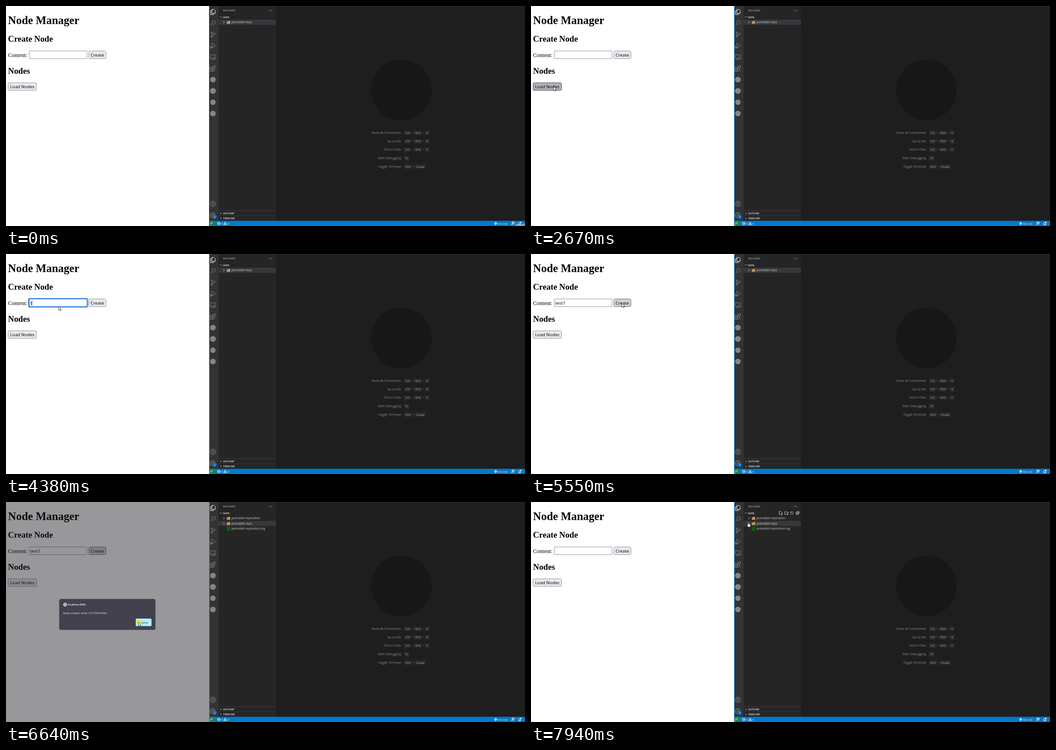
An HTML page for the animation above (8000 ms loop, 1150x487 px).

```html
<!DOCTYPE html>
<html lang="en">
<head>
<meta charset="utf-8">
<title>Node Manager</title>
<style>
html, body { margin: 0; width: 100%; height: 100%; overflow: hidden; background: #fff; }
svg { display: block; width: 100%; height: 100%; }
text { font-family: "Open Sans", "Noto Sans", sans-serif; white-space: pre; }
.serif { font-family: "Liberation Serif", serif; }
.bold { font-weight: 700; }
.form { font-size: 9.73px; }
.tree { font-size: 6.46px; fill: #ccc; }
.section { font-size: 5.6px; font-weight: 700; fill: #ccc; }
.label { font-size: 6.9px; fill: #8b8b8b; text-anchor: end; }
.key { font-size: 5.5px; fill: #aaa; text-anchor: middle; }
.dialog { font-size: 5.71px; fill: #fbfbfe; }
.line { fill: none; stroke-width: 1; stroke-linejoin: round; stroke-linecap: round; }
.btn { fill: #e9e9ed; stroke: #8f8f9d; }
.btn.hover { fill: #d0d0d7; stroke: #676774; }
.btn.active { fill: #b1b1b9; stroke: #484851; }
.field { fill: #fff; stroke: #8f8f9d; }
.field.hover { stroke: #676774; }
.hidden { display: none; }
</style>
</head>
<body>
<svg viewBox="0 0 1150 487" preserveAspectRatio="none">
  <rect width="451" height="487" fill="#fff"/>
  <g class="serif">
    <text class="serif bold" x="4.6" y="40" font-size="24.8">Node Manager</text>
    <text class="serif bold" x="4.6" y="79" font-size="18.6">Create Node</text>
    <text class="serif" x="4.6" y="112.6" font-size="12.4">Content:</text>
    <text class="serif bold" x="4.6" y="149.6" font-size="18.6">Nodes</text>
  </g>
  <rect id="field" class="field" x="51.5" y="99.5" width="128" height="17" rx="1.5"/>
  <g id="focus" fill="none">
    <rect x="49.2" y="97.8" width="132.8" height="20.4" rx="3" stroke="#bcd2f5" stroke-width="1.6"/>
    <rect x="50.7" y="99.2" width="129.2" height="17.6" rx="1.8" stroke="#0060df" stroke-width="1.7"/>
  </g>
  <text id="typed" class="form" x="53.7" y="112.2"></text>
  <path id="caret" d="M0 103v11" stroke="#000" stroke-width=".9"/>
  <rect id="create" class="btn" x="183.5" y="99.5" width="38" height="17" rx="3"/>
  <text class="form" x="202.3" y="112.2" text-anchor="middle">Create</text>
  <rect id="load" class="btn" x="4.5" y="169.9" width="63" height="17" rx="3"/>
  <text class="form" x="36" y="182.3" text-anchor="middle">Load Nodes</text>

  <g id="dialog">
    <rect width="451" height="487" fill="#1c1b22" fill-opacity=".45"/>
    <rect x="118" y="214.7" width="213" height="68.3" rx="3.5" fill="#42414d" stroke="#5b5a66" stroke-width=".6"/>
    <g class="line" stroke="#fbfbfe" stroke-width=".8">
      <circle cx="131" cy="227.2" r="3.7"/><ellipse cx="131" cy="227.2" rx="1.6" ry="3.7"/>
      <path d="M127.3 227.2h7.4"/>
    </g>
    <text class="dialog" x="137" y="229.3" font-weight="600">localhost:8080</text>
    <text class="dialog" x="126.6" y="247.7">Node created: node-1731795575502</text>
    <rect id="accept" x="287.5" y="258" width="35" height="16.8" rx="2"/>
    <text class="dialog" x="305" y="268.8" text-anchor="middle" style="fill:#2b2a33">Aceptar</text>
    <circle id="glow" cx="294" cy="266.3" r="6" fill="#d9ec45" fill-opacity=".88"/>
  </g>

  <rect x="451" width="699" height="487" fill="#1e1e1e"/>
  <rect x="451" width="20" height="476" fill="#333"/>
  <rect x="471" width="127" height="476" fill="#252526"/>
  <path d="M451 .5h699" stroke="#343434"/>
  <rect id="edge" x="450" width="1.2" height="487"/>
  <circle cx="876" cy="186" r="67" fill="#171717"/>

  <g class="line" stroke="#858585">
    <path stroke="#fff" d="M456.5 7.5h4l3 3v6h-7zM456.5 10.5h-3.500v8.500h6.500v-2.500"/>
    <g><circle cx="460" cy="36.500" r="3.900"/><path d="M457 39.500l-4 4"/></g>
    <g><circle cx="456" cy="59" r="1.700"/><circle cx="456" cy="67.500" r="1.700"/><circle cx="461.500" cy="61.500" r="1.700"/>
      <path d="M456 60.700v5M461.500 63.200q0 2-5.500 2"/></g>
    <path d="M456 86v-4l8 5.500-5.500 4"/><circle cx="455.500" cy="91" r="2.500"/><path d="M452.500 88.500l1 1M452 91h6.500M452.500 94l1-1"/>
    <path d="M458 116h-5v-8h11v4M454.500 118.500h3.500"/><circle cx="461.500" cy="116" r="2.700"/><path d="M460.700 115l1 1-1 1" stroke-width=".7"/>
    <path d="M452.500 135.500h5v8.500h-5zM452.500 139.500h9.500v4.500h-9.500M459.500 132.500h4.500v4.500h-4.500z"/>
    <circle cx="458.500" cy="438" r="6"/><circle cx="458.500" cy="436.300" r="2.300"/><path d="M454.600 442.500q.5-3 3.900-3t3.900 3"/>
    <circle cx="458" cy="463" r="4.600"/><circle cx="458" cy="463" r="1.700"/>
    <circle cx="458" cy="463" r="5.600" stroke-width="1.600" stroke-dasharray="2 2.400" stroke-linecap="butt"/>
  </g>
  <g fill="#858585">
    <circle cx="458.5" cy="163" r="6.2"/><circle cx="458.5" cy="188" r="6.5"/>
    <circle cx="458.5" cy="213" r="6"/><circle cx="458.5" cy="238" r="6.2"/>
  </g>
  <circle cx="462.7" cy="467.3" r="4.2" fill="#0078d4"/>
  <text x="462.7" y="469.2" font-size="5" fill="#fff" text-anchor="middle">1</text>

  <text x="481" y="11.9" font-size="5.6" fill="#bbb">EXPLORER</text>
  <g fill="#ccc"><circle cx="583.3" cy="10" r=".7"/><circle cx="586" cy="10" r=".7"/><circle cx="588.7" cy="10" r=".7"/></g>
  <path class="line" stroke="#ccc" stroke-width=".9" d="M474 23.500l2 2 2-2M475 457l2 2-2 2M475 468.300l2 2-2 2"/>
  <text class="section" x="481" y="26.500">DATA</text>
  <path d="M471 452.700h127M471 464.300h127" stroke="#414141" stroke-width=".8"/>
  <text class="section" x="481" y="461">OUTLINE</text>
  <text class="section" x="481" y="472.300">TIMELINE</text>
  <g id="tools" class="line" stroke="#c5c5c5" stroke-width=".8">
    <path d="M552 28h-2v-7h4l2 2v2M553.500 27h4M555.500 25v4M564.500 27.500h-2.500v-6h3l1 1h4v2M566 27h4M568 25v4M575.600 22.500a3 3 0 1 0 2.500-1.200M575.500 21v2h2M589.500 23v-2h4.500v4.500h-1.500M587.500 23h5v4.500h-5zM588.800 25.300h2.500"/>
  </g>
  <rect id="selected" x="471" width="127" height="11.5" fill="#37373d"/>
  <g id="replication"></g>
  <g id="repo"></g>
  <g id="log">
    <rect x="489.400" y="55.400" width="7" height="7" fill="#0a3d0a" stroke="#159415" stroke-width=".8"/>
    <path d="M490.800 58h1.500M493 58h2M490.800 60h3" stroke="#1fb01f" stroke-width=".8"/>
    <text class="tree" x="499.700" y="61.300">jackrabbit-replication.log</text>
  </g>
  <g id="welcome"></g>

  <rect x="451" y="475.500" width="699" height="11.500" fill="#007acc"/>
  <rect x="451" y="475.500" width="12.500" height="11.500" fill="#16825d"/>
  <g class="line" stroke="#fff" stroke-width=".8">
    <path d="M452.500 480l2 2-2 2M457.500 478l-2 2 2 2"/>
    <circle cx="471.500" cy="481.300" r="3"/><path d="M470.300 480.100l2.400 2.400M472.700 480.100l-2.400 2.400"/>
    <path d="M485.700 478.300l3 5.700h-6zM485.700 480.500v1.500M485.700 483v.1"/>
    <circle cx="1085" cy="481" r="2.500"/><circle cx="1085" cy="481" r=".7"/><path d="M1085 482v2.500"/>
    <circle cx="1122.300" cy="480.500" r="1.200"/><path d="M1120 484.500q.3-2.300 2.300-2.300t2.300 2.300M1121 478.200h5.200v3.300h-1.500"/>
    <path d="M1135.800 483.300h5.400l-.8-1.300v-1.700a1.900 1.900 0 0 0-3.800 0v1.700zM1138 484.600h1"/>
  </g>
  <circle cx="1140.700" cy="479" r="1.400" fill="#fff"/>
  <g font-size="6.1" fill="#fff">
    <text x="476.600" y="483.600">0</text><text x="490.600" y="483.600">0</text><text x="1090" y="483.600">Go Live</text>
  </g>
  <rect id="corner" x="1129" y="482" width="21" height="5" fill="#a9bfd2" fill-opacity=".6"/>

  <g id="cursor" fill="#fff" stroke="#222" stroke-width=".8" stroke-linejoin="round">
    <path id="arrow" d="M.4 .4V9.600L2.400 7.700 3.900 11 5.400 10.300 4 7.200H6.700Z"/>
    <path id="hand" d="M2.700 6.700V1.300q.8-1 1.600 0V4.500L7.500 5.200Q8.600 5.600 8.400 7L7.600 11.500H3.400L.7 7.600Q.6 6 1.700 6.400Z"/>
  </g>
</svg>
<script>
const LOOP = 8000;
const $ = id => document.getElementById(id);

const folder = (name, y) => `
  <path class="line" stroke="#ccc" stroke-width=".9" d="M482 ${y - 2}l2 2-2 2"/>
  <path fill="#c09553" d="M489.200 ${y - 2.200}h3.200l.8-1h3.600v6.600h-7.600z"/>
  <text class="tree" x="499.700" y="${y + 2.300}">${name}</text>`;
$("replication").innerHTML = folder("jackrabbit-replication", 36);
$("repo").innerHTML = folder("jackrabbit-repo", 36);

const keyBox = (x, w, y, label) => `
  <rect x="${x}" y="${y - 5}" width="${w}" height="10" rx="1.500" fill="#2b2b2b"/>
  <text class="key" x="${x + w / 2}" y="${y + 2}">${label}</text>`;
const plus = (x, y) => `<text class="key" x="${x}" y="${y + 2}">+</text>`;
const chord = letter => y => keyBox(882, 15, y, "Ctrl") + plus(900.5, y) +
  keyBox(904, 17.5, y, "Shift") + plus(925, y) + keyBox(928, 10.5, y, letter);
const commands = [
  ["Show All Commands", chord("A")],
  ["Go to File", chord("N")],
  ["Find in Files", chord("F")],
  ["Start Debugging", y => keyBox(882, 12, y, "F5")],
  ["Toggle Terminal", y => keyBox(882, 17.5, y, "Shift") + plus(903, y) + keyBox(906, 24, y, "Escape")]
];
$("welcome").innerHTML = commands.map(([name, keys], i) => {
  const y = 280.7 + i * 18.7;
  return `<text class="label" x="875.300" y="${y + 2.300}">${name}</text>${keys(y)}`;
}).join("");

// Pointer waypoints: time, x, y
const path = [
  [270, 1003, 420], [620, 740, 290], [1030, 625, 232], [1100, 400, 208], [1240, 257, 190],
  [1520, 165, 164], [1850, 133, 155], [1920, 128, 155], [2120, 128, 155], [2470, 49.5, 177.5],
  [2940, 49.5, 177.5], [3290, 92, 148], [3770, 116, 115], [4590, 116, 115], [4800, 152, 171],
  [5010, 201, 108], [5880, 201, 108], [6370, 293, 265], [7100, 293, 265], [7800, 478, 44]
];
const STEP = 70;

function pointerAt(t) {
  const next = path.findIndex(p => p[0] > t);
  if (next < 0) return path[path.length - 1].slice(1);
  const [t0, x0, y0] = path[Math.max(0, next - 1)];
  const [t1, x1, y1] = path[next];
  const held = Math.floor(Math.max(0, t - t0) / STEP) * STEP;
  const k = next ? held / (t1 - t0) : 0;
  return [x0 + (x1 - x0) * k, y0 + (y1 - y0) * k];
}

const word = "test1";
const keyTimes = [4310, 4450, 4520, 4590, 4730];

function render(t) {
  const during = (a, b) => t >= a && t < b;
  const show = (id, on) => $(id).classList.toggle("hidden", !on);
  const state = (id, hover, active) => {
    $(id).classList.toggle("hover", hover);
    $(id).classList.toggle("active", active);
  };

  show("corner", t < 70);
  $("edge").setAttribute("fill", t < 1450 ? "#333" : "#0a84d8");

  state("load", during(2400, 3150), during(2670, 2810));
  state("create", during(5010, 6910), during(5410, 5550));
  state("field", during(3640, 4660), false);

  const focused = during(3840, 5480);
  const typed = t < 6910 ? word.slice(0, keyTimes.filter(k => t >= k).length) : "";
  $("typed").textContent = typed;
  show("focus", focused);
  show("caret", focused);
  const caretX = 54 + (typed ? $("typed").getComputedTextLength() : 0);
  $("caret").setAttribute("transform", `translate(${caretX})`);

  show("dialog", during(5620, 6910));
  $("accept").setAttribute("fill", t >= 6640 ? "#aaf2ff" : t >= 6300 ? "#80ebff" : "#00ddff");
  show("glow", t >= 6640);

  const replicated = t >= 6090;
  show("replication", replicated);
  show("log", replicated);
  $("repo").setAttribute("transform", `translate(0 ${replicated ? 11.6 : 0})`);
  $("selected").setAttribute("y", replicated ? 41.7 : 30.2);

  const [x, y] = pointerAt(t);
  show("tools", t > 7100 && x > 471);
  show("cursor", t >= 270);
  show("arrow", t < 7940);
  show("hand", t >= 7940);
  $("cursor").setAttribute("transform", `translate(${x} ${y})`);
}

const start = performance.now();
function tick() {
  render((performance.now() - start) % LOOP);
  requestAnimationFrame(tick);
}
tick();
</script>
</body>
</html>
```
